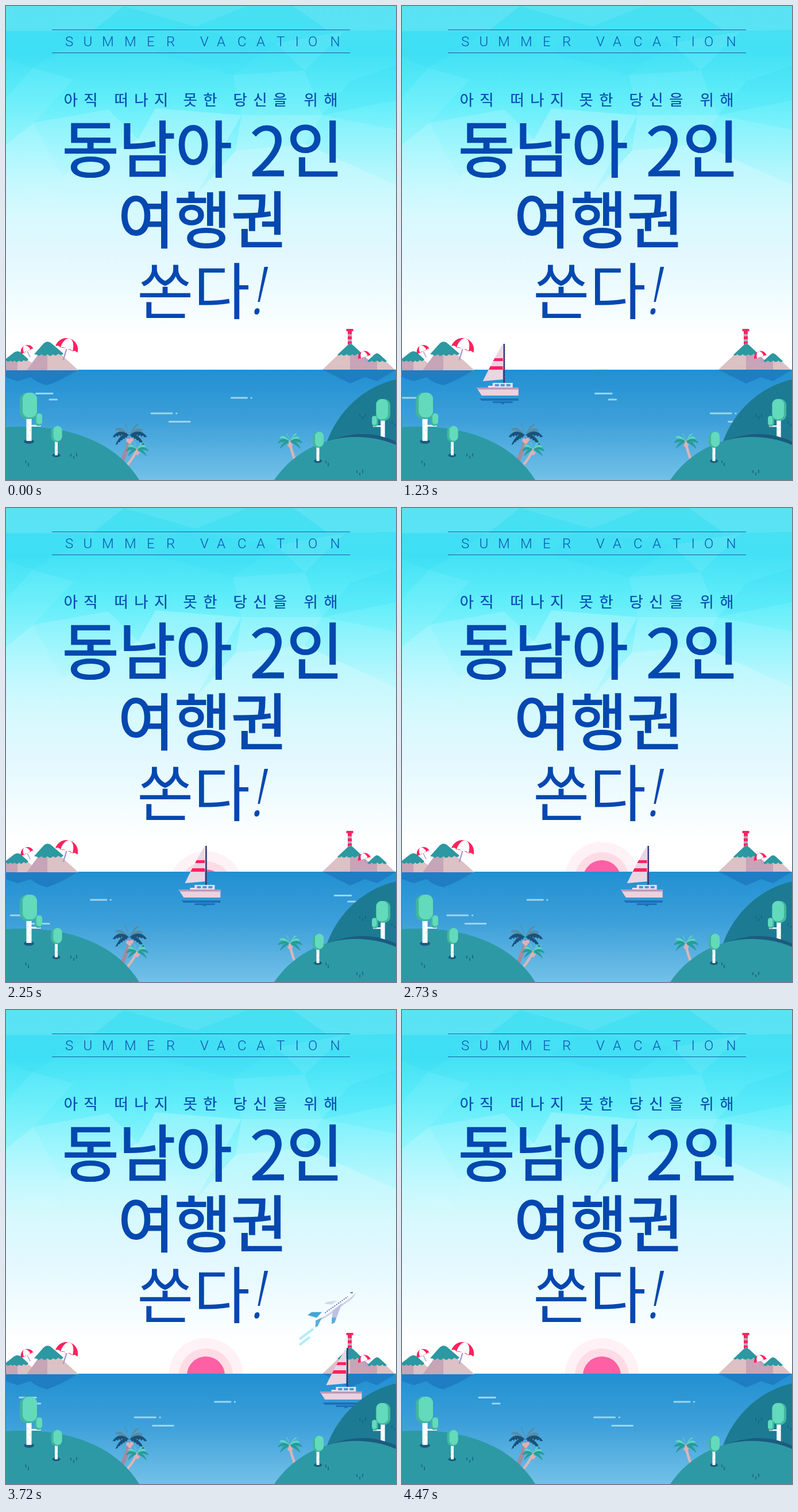
An HTML page that plays this animation: 679 by 825 pixels, repeating every 6470 ms.

```html
<!DOCTYPE html>
<html lang="ko">
<head>
<meta charset="utf-8">
<title>Summer Vacation</title>
<style>
html, body { margin: 0; width: 100%; height: 100%; overflow: hidden; background: #fff; }
svg { display: block; width: 100vw; height: 100vh; }
text { font-family: "Noto Sans CJK KR", "Noto Sans CJK", "Noto Sans KR", sans-serif; fill: #0448b0; }
.big { font-size: 107px; stroke: #0448b0; stroke-width: 2.2px; }
.thin { font-size: 107px; }
.bang { font: italic 300 114px "Open Sans", sans-serif; }
.sub { font-size: 26.5px; letter-spacing: 10.4px; stroke: #0448b0; stroke-width: .2px; }
.cap { font: 300 24px Roboto, sans-serif; fill: #0c52b4; }
</style>
</head>
<body>
<svg viewBox="0 0 679 825" preserveAspectRatio="none">
  <defs>
    <linearGradient id="sky" x2="0" y2="1">
      <stop offset="0" stop-color="#48dff2"/>
      <stop offset=".1" stop-color="#43e1f5"/>
      <stop offset=".2" stop-color="#62eefa"/>
      <stop offset=".28" stop-color="#88f3fc"/>
      <stop offset=".36" stop-color="#aff6fd"/>
      <stop offset=".44" stop-color="#cff8fd"/>
      <stop offset=".52" stop-color="#e0f8fe"/>
      <stop offset=".62" stop-color="#f1fcff"/>
      <stop offset=".7" stop-color="#fff"/>
    </linearGradient>
    <linearGradient id="fade" x2="0" y2="1">
      <stop offset="0" stop-color="#fff" stop-opacity=".36"/>
      <stop offset="1" stop-color="#fff" stop-opacity="0"/>
    </linearGradient>
    <linearGradient id="sea" x2="0" y2="1">
      <stop offset="0" stop-color="#2190d2"/>
      <stop offset=".45" stop-color="#3c9fd9"/>
      <stop offset="1" stop-color="#72c1e8"/>
    </linearGradient>
    <clipPath id="sail"><path d="M-2 588Q-17 612-37 653L-2 650Z"/></clipPath>
    <g id="brolly">
      <path d="M0 0V20" stroke="#a99bd0" stroke-width="2.4"/>
      <path d="M-20 1A20 20 0 0 1 20 1Q15-3 11 1Q0-3-11 1Q-15-3-20 1Z" fill="#ff2260"/>
      <path d="M-11 1A11 20 0 0 1 11 1Q6-3 0 0Q-6-3-11 1Z" fill="#fff"/>
    </g>
    <g id="tree">
      <ellipse cy="28" rx="7" ry="3.2" fill="#1b5b80"/>
      <path d="M-2.500 0h5v28h-5z" fill="#fff"/>
      <path d="M-1 9v4M1 17v3" stroke="#c5d8e0"/>
      <rect x="-9" y="-23" width="19" height="28" rx="9" fill="#42b59f"/>
      <rect x="-5" y="-23" width="15" height="26" rx="7.500" fill="#62dabb"/>
    </g>
    <g id="bigtree">
      <ellipse cy="40" rx="9" ry="4" fill="#1b5b80"/>
      <path d="M-4.500 0h9v11h12v-4h4v7h-16v25h-9z" fill="#fff"/>
      <path d="M-2 8v5M2 19v4M-2 28v4" stroke="#c5d8e0"/>
      <rect x="10" y="-9" width="13" height="22" rx="6" fill="#42b59f"/>
      <rect x="13" y="-9" width="10" height="19" rx="5" fill="#62dabb"/>
      <rect x="-16" y="-45" width="30" height="46" rx="13" fill="#42b59f"/>
      <rect x="-11" y="-45" width="25" height="43" rx="11" fill="#62dabb"/>
    </g>
    <path id="grass" d="M-5-3v5M0 1v5M5-4v6" stroke="#1b5f82" stroke-width="1.500"/>
    <g id="waves" stroke="#9ed4ef" stroke-width="3.200" stroke-linecap="round">
      <path d="M52.500 674.500H81M76 685H88.500M253 709H289M296.800 709h.2M284.500 723.500H320M392.500 682H419.500M427 682h.2"/>
    </g>
  </defs>

  <rect width="679" height="825" fill="url(#sky)"/>
  <g id="facets">
    <g fill="#fff">
      <path d="M0 0H205L150 44H0Z" opacity=".1"/>
      <path d="M205 0H420L330 36Z" opacity=".08"/>
      <path d="M500 0H679V42L560 43Z" opacity=".1"/>
      <path d="M0 160L46 108L118 128L48 203L0 240Z" opacity=".07"/>
      <path d="M0 241L48 203L98 296L88 348L0 320Z" opacity=".22"/>
      <path d="M48 203L178 180L230 232L98 296Z" opacity=".15"/>
      <path d="M260 178L410 190L330 330L230 232Z" opacity=".22"/>
      <path d="M395 120L520 112L550 190L410 190Z" opacity=".08"/>
      <path d="M410 190L550 190L520 240L400 252Z" opacity=".2"/>
      <path d="M550 190L679 215V312L520 240Z" opacity=".1"/>
      <path d="M470 65L590 44L520 112Z" opacity=".08"/>
    </g>
    <g fill="url(#fade)">
      <path d="M0 320L88 348L98 296L230 232L330 330L400 470H0Z"/>
      <path d="M330 330L400 252L520 240L679 312V470H400Z"/>
    </g>
    <g fill="#20cfee">
      <path d="M0 43H150L46 108L0 90Z" opacity=".13"/>
      <path d="M300 36L470 65L395 120L262 82Z" opacity=".08"/>
      <path d="M600 130L679 104V164L550 190Z" opacity=".14"/>
    </g>
  </g>

  <path d="M80 41.500H599M80 81.500H599" stroke="#185ca6"/>
  <text class="cap" y="69.500" x="103 134.500 167 206 245 279 338 367 403 436 471 503.500 526 564.500">SUMMERVACATION</text>
  <g class="sub">
    <text x="100.500" y="173">아직</text><text x="188.500" y="173">떠나지</text><text x="308.500" y="173">못한</text>
    <text x="395.500" y="173">당신을</text><text x="518.500" y="173">위해</text>
  </g>
  <text class="big" x="98" y="288.500">동남아</text>
  <text class="big" x="424" y="296" style="font-size:118px;stroke-width:.8px">2</text>
  <text class="big" x="488.500" y="288.500">인</text>
  <text class="big" x="195" y="411.500">여행권</text>
  <text class="thin" x="228" y="535.500">쏜다</text>
  <text class="bang" x="428" y="536">!</text>

  <g id="sun">
    <circle cx="348" r="65" fill="#fff2f6"/>
    <circle cx="348" r="47" fill="#ffdce5"/>
    <circle cx="348" r="33" fill="#ff5fa4"/>
  </g>

  <g id="plane">
    <path d="M511 573L535 555M511 583L529 569" stroke="#b4edf6" stroke-width="4.200"/>
    <g transform="translate(610 490) rotate(-35.500)">
      <path d="M-45-4L-58-15L-52-15L-33-5Z" fill="#d5d8ef"/>
      <path d="M-82-2L-93-16L-84-16L-67-4Z" fill="#45a5d8"/>
      <path d="M-2 0Q-9-6.500-20-6.500H-66L-92-1Q-82 5-66 6H-20Q-6 6-2 0Z" fill="#fafbff"/>
      <path d="M-2 1Q-10 3-22 3H-68L-90 0Q-82 5-66 6H-20Q-6 6-2 1Z" fill="#cfcfe9"/>
      <path d="M-66-1.500H-17" stroke="#3f86c4" stroke-width="2" stroke-dasharray="2 2"/>
      <path d="M-10-4L-6-2" stroke="#3f86c4" stroke-width="2"/>
      <path d="M-32 2L-62 22L-68 21L-53 3Z" fill="#bfc0e2"/>
      <path d="M-62 22L-68 21L-61 12L-55 17Z" fill="#58aedb"/>
      <path d="M-75 2L-90 10L-94 9L-87 0Z" fill="#58aedb"/>
    </g>
  </g>

  <rect y="633" width="679" height="192" fill="url(#sea)"/>

  <g id="islands">
    <path d="M0 633H125Q98 651 72 660Q55 657 43 646Q30 650 20 653L0 646ZM551 633H679L646 653L625 646L599 657Z" fill="#1f7dc4"/>
    <path d="M0 617L20 601L60 634H0Z" fill="#dcc1c5"/>
    <path d="M0 617L20 601V634H0Z" fill="#c7a4b7"/>
    <path d="M0 614L14 603Q20 599 26 603L39 615Q35 621 31 616Q27 622 23 617Q19 622 15 617Q11 621 8 617Q4 621 0 617Z" fill="#2b98a2"/>
    <use href="#brolly" transform="translate(37 601) rotate(-26) scale(.58)"/>
    <path d="M36 634L72 585L126 634Z" fill="#dcc1c5"/>
    <path d="M36 634L72 585V634Z" fill="#c7a4b7"/>
    <path d="M49 606L65 588Q72 581 79 587L100 605Q96 610 91 605Q87 611 82 606Q77 612 72 606Q67 612 62 606Q57 611 54 607Z" fill="#2b98a2"/>
    <use href="#brolly" transform="translate(105.500 597) rotate(17)"/>
    <path d="M595 566h7v23h-7z" fill="#ff2260"/>
    <path d="M595 571h7v4h-7zM595 580h7v4h-7z" fill="#b9a5c0"/>
    <path d="M592.500 562h12v4h-12z" fill="#ff2260"/>
    <path d="M551 633L599 587L650 633Z" fill="#dcc1c5"/>
    <path d="M599 587L650 633H599Z" fill="#c7a4b7"/>
    <path d="M577 607L593 592Q599 585 605 591L621 606Q616 610 612 605Q608 611 603 606Q598 611 593 606Q588 611 584 606Q581 610 577 607Z" fill="#2b98a2"/>
    <use href="#brolly" transform="translate(624 611) rotate(-18) scale(.56)"/>
    <path d="M614 633L646 604L677 633Z" fill="#dcc1c5"/>
    <path d="M614 633L646 604V633Z" fill="#c7a4b7"/>
    <path d="M629 618L641 607Q646 602 651 607L663 618Q659 622 655 617Q651 622 646 617Q641 622 637 617Q633 622 629 618Z" fill="#2b98a2"/>
  </g>

  <use id="wave1" href="#waves"/>
  <use id="wave2" href="#waves"/>

  <g id="boat">
    <path d="M-43 683H25V687H-39ZM-20 688H15V691H-20ZM-5 691H0V693H-5Z" fill="#1d6fb8"/>
    <path d="M-2 588Q-17 612-37 653L-2 650Z" fill="#ead5e2"/>
    <path clip-path="url(#sail)" d="M-40 613H0V618H-40ZM-40 627H0V633H-40Z" fill="#ff2260"/>
    <path d="M0 588V657" stroke="#243a75" stroke-width="2.600"/>
    <path d="M1.300 594V656" stroke="#a8607f" stroke-width="1" stroke-dasharray="2 3"/>
    <path d="M-20 656H15V665H-20Z" fill="#efdcea"/>
    <path d="M-16 658h7v4h-7zM-6 658h7v4h-7zM4 658h7v4h-7z" fill="#4a9bd2"/>
    <path d="M-28 661H-18V665H-28Z" fill="#efdcea"/>
    <path d="M-48 664H25V678H-39Z" fill="#ead2df"/>
    <path d="M-48 664H25V667.500H-45.500Z" fill="#bd98b8"/>
  </g>

  <path d="M558 760C578 704 624 662 679 650V825H558Z" fill="#1c7b92"/>
  <use href="#grass" x="621" y="713"/><use href="#grass" x="677" y="726"/>
  <use href="#bigtree" transform="translate(656 721) scale(-.82 .82)"/>

  <g fill="none" stroke-linecap="round">
    <path d="M215 755Q211 772 199 799" stroke="#a28ba0" stroke-width="7"/>
    <path d="M228 772Q223 785 211 799" stroke="#d9b6b8" stroke-width="4.500"/>
    <path d="M494 758Q496 772 503 790" stroke="#d9b6b8" stroke-width="4.500"/>
  </g>
  <g id="palms"></g>

  <path d="M0 733C95 726 187 752 232 825H0Z" fill="#2d99a5"/>
  <path d="M556 759Q604 740 645 747Q664 751 679 758V780H556Z" fill="#1b5b80"/>
  <path d="M467 825C500 776 555 750 608 750Q647 750 679 764V825Z" fill="#2d99a5"/>
  <use href="#bigtree" x="40" y="718"/>
  <use href="#tree" x="87.500" y="754"/>
  <use href="#tree" x="543" y="764"/>
  <use href="#grass" x="118" y="782"/><use href="#grass" x="616" y="811"/>
  <path d="M34.500 791v5M39 795v6M557 791v5M561 795v6" stroke="#1b5f82" stroke-width="1.500"/>
</svg>
<script>
const $ = id => document.getElementById(id);

// One arched frond from the crown to (dx, dy), lightly toothed along the underside.
function frond([dx, dy, fill]) {
  const arch = 9 + Math.abs(dx) * .22;
  let d = `M0 0Q${dx * .6} ${dy * .5 - arch} ${dx} ${dy}`;
  for (let i = 5; i > 0; i--) {
    const k = i / 6, x = dx * k, y = dy * k - arch * .4 * k * (1 - k);
    d += `L${x} ${y + 2}L${x - dx * .04} ${y - 1}`;
  }
  return `<path d="${d}Z" fill="${fill}"/>`;
}

function palm(x, y, scale, dark, light) {
  const tips = [[-8, -21, light], [17, -19, light], [-25, -10, light], [24, -8, light],
    [-29, 3, dark], [31, 3, dark], [-24, 17, dark], [26, 17, dark]];
  const nuts = [[-2, 9], [4, 8], [1, 12]]
    .map(([a, b]) => `<circle cx="${a}" cy="${b}" r="3.2" fill="#e5aeb0"/>`).join("");
  return `<g transform="translate(${x} ${y}) scale(${scale})">${tips.map(frond).join("")}${nuts}</g>`;
}

$("palms").innerHTML =
  palm(214.5, 747, 1, "#1b5279", "#5a8ba2") +
  palm(228, 772, .66, "#249c96", "#62dabb") +
  palm(494, 758, .72, "#249c96", "#62dabb");

const LOOP = 6470, STEP = 30, END = 4470;
const move = (id, x, y = 0) => $(id).setAttribute("transform", `translate(${x.toFixed(2)} ${y.toFixed(2)})`);

function draw(now) {
  const t = Math.min(END, Math.floor((now % LOOP) / STEP) * STEP);
  move("boat", 57.3 + (t - 510) * .1673);
  move("wave1", t * .231);
  move("wave2", 81.5 - (END - t) * .147);
  move("sun", 0, Math.max(636, 678 - (t - 1770) / 30));
  const fly = (t - 3720) * .396;
  move("plane", fly, -fly * .81);
  $("plane").style.display = t < 3240 ? "none" : "";
}

const start = performance.now();
function tick() {
  draw(performance.now() - start);
  requestAnimationFrame(tick);
}
draw(0);
requestAnimationFrame(tick);
</script>
</body>
</html>
```
